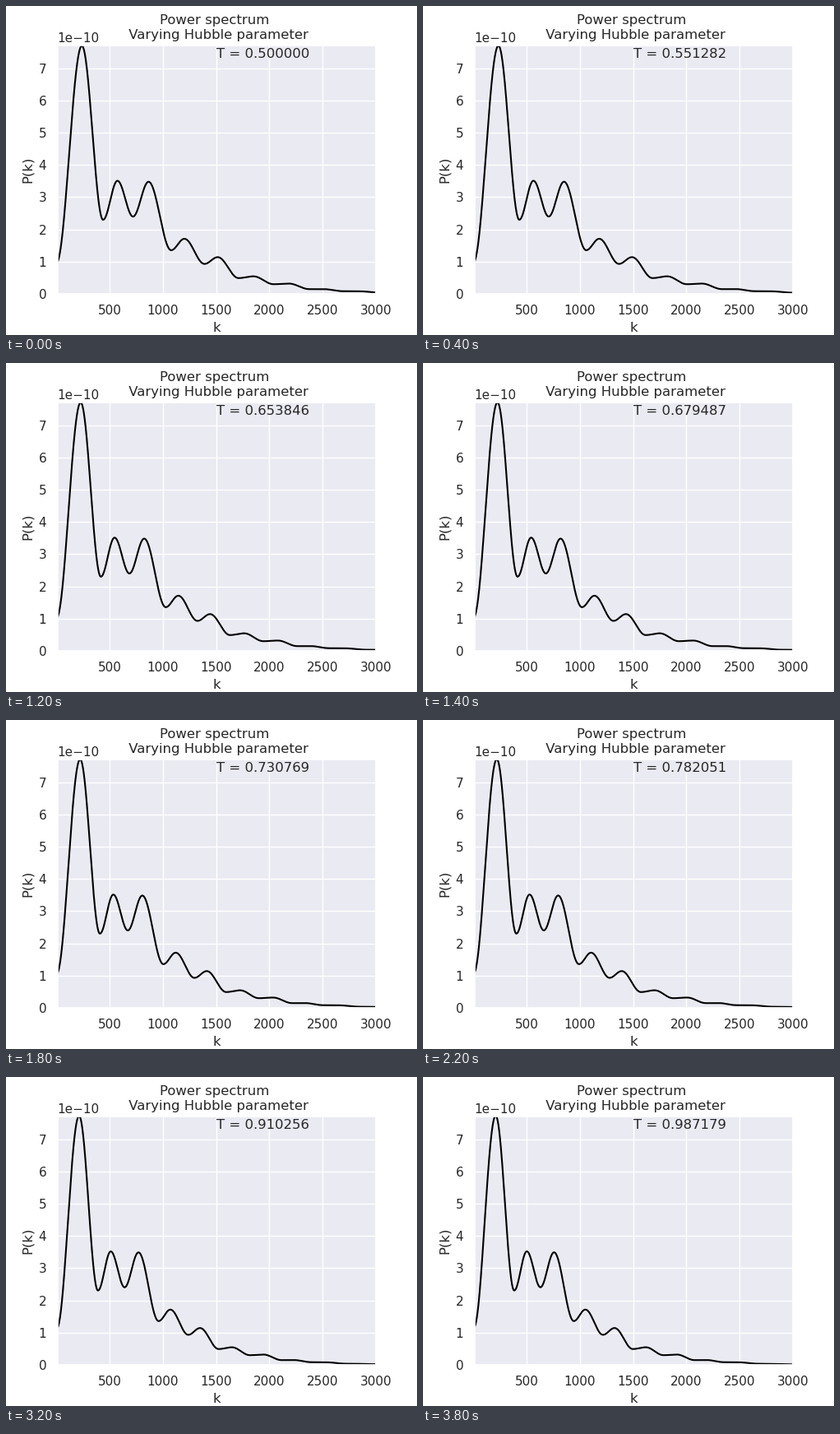
Recreate the animation shown at these times as a matplotlib script. Size 500 by 400 pixels, loop 4000 ms.

```python
import numpy as np
import matplotlib.pyplot as plt
from matplotlib.animation import FuncAnimation

FRAMES, INTERVAL = 20, 200
INK = "0.15"
TEXT_SIZE = 11.87  # lands on whole 16 px glyph heights
K_MIN, K_MAX = 10, 3000
P_MAX = 7.71e-10
H_START = 0.5
OMEGA_M, OMEGA_R = 0.144, 4.2e-5

# Peaks and troughs at H_START: wavenumber, power / 1e-10
TURNS = np.array([
    (0, 0.95), (240, 7.7), (439, 2.3), (574, 3.51), (720, 2.4), (866, 3.48),
    (1078, 1.355), (1202, 1.71), (1391, 0.93), (1515, 1.14), (1711, 0.49),
    (1850, 0.545), (2040, 0.3), (2182, 0.32), (2375, 0.147), (2500, 0.15),
    (2690, 0.083), (2840, 0.08), (3060, 0.035), (3600, 0.01),
])


def wave(q):
    """Ease along a half cosine from each turning point to the next."""
    x, y = TURNS.T
    i = np.searchsorted(x, q, side="right") - 1
    t = (q - x[i]) / (x[i + 1] - x[i])
    return y[i] + (y[i + 1] - y[i]) * (1 - np.cos(np.pi * t)) / 2


def distance(h):
    """Comoving distance to last scattering in a flat universe."""
    a = np.exp(np.linspace(0, np.log(1101), 2000))
    dark = h * h - OMEGA_M - OMEGA_R
    f = a / np.sqrt(OMEGA_M * a**3 + OMEGA_R * a**4 + dark)
    return np.sum(f[1:] + f[:-1])


k = np.arange(K_MIN, K_MAX + 1)


def spectrum(h):
    scale = distance(h) / distance(H_START)
    t = (h - H_START) / 0.5
    power = wave(k / scale) * (1 + 0.004 * t)
    return 1e-10 * (power + 0.25 * t * np.exp(-k / 40))


plt.rcParams.update({
    "font.family": "DejaVu Sans",
    "font.size": TEXT_SIZE,
    "axes.titlesize": TEXT_SIZE,
    "axes.labelsize": TEXT_SIZE,
    "axes.facecolor": "#EAEAF2",
    "axes.edgecolor": "white",
    "axes.linewidth": 1.25,
    "axes.axisbelow": True,
    "axes.labelcolor": INK,
    "text.color": INK,
    "grid.color": "white",
    "grid.linewidth": 1,
    "lines.solid_capstyle": "round",
    "xtick.bottom": False,
    "ytick.left": False,
})
for axis in ("xtick", "ytick"):
    plt.rcParams.update({
        f"{axis}.color": INK,
        f"{axis}.labelsize": 11,
        f"{axis}.major.size": 6,
        f"{axis}.major.pad": 3.5,
    })

fig, ax = plt.subplots(figsize=(5, 4), dpi=100, facecolor="white")
fig.subplots_adjust(left=0.125, right=0.9, bottom=0.125, top=0.88)
ax.set_xlim(K_MIN, K_MAX)
ax.set_ylim(0, P_MAX)
ax.set_xticks(np.arange(500, 3001, 500))
ax.set_yticks(np.arange(8) * 1e-10)
ax.grid(True)
ax.set_title("Power spectrum \n Varying Hubble parameter", y=1.0, pad=6)
ax.set_xlabel("k")
ax.set_ylabel("P(k)")

line, = ax.plot(k, spectrum(H_START), color="black", lw=1.5)
label = ax.text(1500, 0.95 * P_MAX, "")


def update(i):
    h = H_START + i / 39
    line.set_ydata(spectrum(h))
    label.set_text(f"T = {h:.6f}")
    return line, label


anim = FuncAnimation(fig, update, frames=FRAMES, interval=INTERVAL,
                     repeat=True, repeat_delay=0)
plt.show()
```
